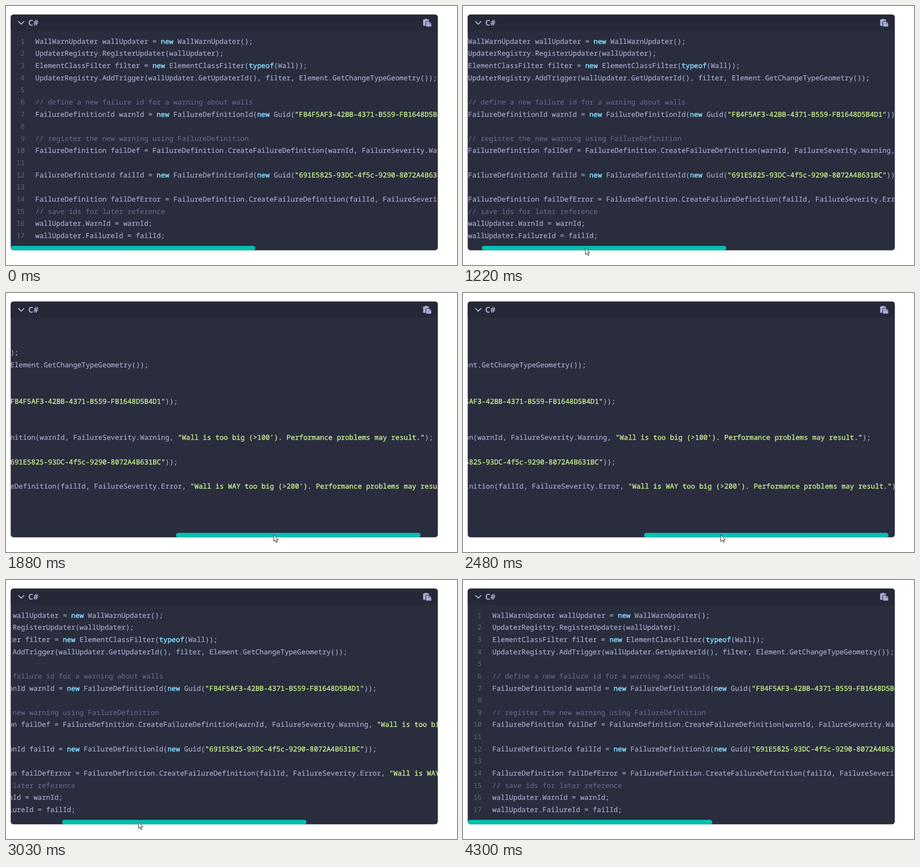
An HTML page that plays this animation: 986x568 px, repeating every 4.82 s.

```html
<!DOCTYPE html>
<html lang="en">
<head>
<meta charset="utf-8">
<title>Scrolling code block</title>
<style>
  html, body { margin: 0; width: 100%; height: 100%; overflow: hidden; background: #fff; }
  svg { display: block; }
  text { white-space: pre; text-rendering: geometricPrecision; }
  .code { font: 15.265px "Noto Sans Mono", monospace; fill: #a6accd; stroke: #a6accd; stroke-width: .2px; }
  .num { fill: #5f647c; stroke: none; text-anchor: end; }
  .note { fill: #676e95; stroke: none; }
  .word { fill: #89ddff; stroke: #89ddff; stroke-width: .5px; }
  .str { fill: #c3e88d; stroke: #c3e88d; stroke-width: .45px; }
  .title { font: 700 17.5px "Noto Sans", sans-serif; fill: #a6accd; }
</style>
</head>
<body>
<svg width="986" height="568" viewBox="0 0 986 568">
  <defs>
    <clipPath id="panel"><rect x="10.3" y="18.8" width="933.7" height="517" rx="6"/></clipPath>
  </defs>
  <g clip-path="url(#panel)">
    <rect x="10" y="18" width="935" height="519" fill="#292d3e"/>
    <rect x="10" y="18" width="935" height="36.5" fill="#252837"/>
    <path d="M27.4 34l5.9 5.9 5.9-5.9" fill="none" stroke="#a6accd" stroke-width="2.2" stroke-linecap="round" stroke-linejoin="round"/>
    <text class="title" x="48.6" y="43">C#</text>
    <g fill="#a6accd">
      <path d="M913.5 29.3h2.6a2.4 2.4 0 0 1 4.4 0h2.6q1.6 0 1.6 1.6v2h-5q-2.6 0-2.6 2.6v8h-3.6q-1.6 0-1.6-1.6v-11q0-1.6 1.6-1.6z"/>
      <path d="M919.3 34h5.5v4.6h4.9v5.7q0 1-1 1h-9.4q-1 0-1-1v-9.3q0-1 1-1zM925.6 34l4.1 3.9h-4.1z"/>
    </g>
    <g id="code" class="code"></g>
    <rect id="thumb" y="526" width="534.5" height="10" rx="5" fill="#02c1b1"/>
  </g>
  <path id="cursor" d="M.5.6V15.1L3.9 12l2.3 5.2 2.1-.9L6 11.2h4.5z" fill="#fff" stroke="#111"/>
</svg>
<script>
const LOOP = 4820, ENTER = 200, LEAVE = 4300, RATIO = 1.747;
const lines = `WallWarnUpdater wallUpdater = new WallWarnUpdater();
UpdaterRegistry.RegisterUpdater(wallUpdater);
ElementClassFilter filter = new ElementClassFilter(typeof(Wall));
UpdaterRegistry.AddTrigger(wallUpdater.GetUpdaterId(), filter, Element.GetChangeTypeGeometry());

// define a new failure id for a warning about walls
FailureDefinitionId warnId = new FailureDefinitionId(new Guid("FB4F5AF3-42BB-4371-B559-FB1648D5B4D1"));

// register the new warning using FailureDefinition
FailureDefinition failDef = FailureDefinition.CreateFailureDefinition(warnId, FailureSeverity.Warning, "Wall is too big (>100'). Performance problems may result.");

FailureDefinitionId failId = new FailureDefinitionId(new Guid("691E5825-93DC-4f5c-9290-8072A4B631BC"));

FailureDefinition failDefError = FailureDefinition.CreateFailureDefinition(failId, FailureSeverity.Error, "Wall is WAY too big (>200'). Performance problems may result.");
// save ids for later reference
wallUpdater.WarnId = warnId;
wallUpdater.FailureId = failId;`.split("\n");

const $ = id => document.getElementById(id);
const code = $("code"), thumb = $("thumb"), cursor = $("cursor");

function add(parent, tag, attrs, content = "") {
  const el = document.createElementNS("http://www.w3.org/2000/svg", tag);
  for (const k in attrs) el.setAttribute(k, attrs[k]);
  el.textContent = content;
  return parent.appendChild(el);
}

function tokenClass(s) {
  if (s.startsWith("//")) return "note";
  if (s.startsWith('"')) return "str";
  return /^(new|typeof)$/.test(s) ? "word" : "";
}

lines.forEach((line, i) => {
  const y = 82.6 + i * 26.65;
  add(code, "text", { class: "num", x: 41, y }, i + 1);
  const row = add(code, "text", { x: 64, y });
  for (const part of line.split(/(\/\/.*|"[^"]*"|\bnew\b|\btypeof\b)/))
    if (part) add(row, "tspan", { class: tokenClass(part) }, part);
});

// Smooth 0..1 between two times
function ease(t, from, to) {
  const u = Math.min(1, Math.max(0, (t - from) / (to - from)));
  return u * u * (3 - 2 * u);
}

// Monotone cubic curve through [time, value] points
function curve(pts) {
  const last = pts.length - 1;
  const slope = i => (pts[i + 1][1] - pts[i][1]) / (pts[i + 1][0] - pts[i][0]);
  const tangent = i => {
    if (i === 0 || i === last) return 0;
    const a = slope(i - 1), b = slope(i);
    return a * b > 0 ? 2 * a * b / (a + b) : 0;
  };
  return t => {
    if (t <= pts[0][0]) return pts[0][1];
    if (t >= pts[last][0]) return pts[last][1];
    const i = pts.findIndex(p => p[0] > t) - 1;
    const [t0, v0] = pts[i], [t1, v1] = pts[i + 1];
    const h = t1 - t0, u = (t - t0) / h, w = 1 - u;
    return v0 * (1 + 2 * u) * w * w + v1 * u * u * (3 - 2 * u)
      + h * u * w * (w * tangent(i) - u * tangent(i + 1));
  };
}

// The drag right and back: time, thumb offset, pointer x
const drag = [
  [960, 0, 204], [1220, 30.5, 267], [1550, 173.3, 450], [2030, 399, 608],
  [2300, 399, 608], [2480, 385.2, 563], [3030, 112, 289], [3470, 10.4, 199], [3730, 0, 199]
];
const thumbAt = curve(drag.map(([t, x]) => [t, x]));
const pointerAt = curve(drag.map(([t, , x]) => [t, x]));

function draw(now) {
  const t = now % LOOP, x = thumbAt(t);
  const coming = 1 - ease(t, ENTER, 670), going = ease(t, 4040, LEAVE);
  const px = pointerAt(t) + 4 * coming - 33 * going;
  const py = 529.5 + 27 * coming - 5.5 * ease(t, 3030, 3600) + 38 * going;
  thumb.setAttribute("x", 10.5 + x);
  code.setAttribute("transform", `translate(${-Math.round(x * RATIO)} 0)`);
  cursor.setAttribute("transform", `translate(${Math.round(px)} ${Math.round(py)})`);
  cursor.setAttribute("visibility", t >= ENTER && t < LEAVE ? "visible" : "hidden");
}

let start;
function tick(now) {
  start ??= now;
  draw(now - start);
  requestAnimationFrame(tick);
}
draw(0);
requestAnimationFrame(tick);
</script>
</body>
</html>
```
